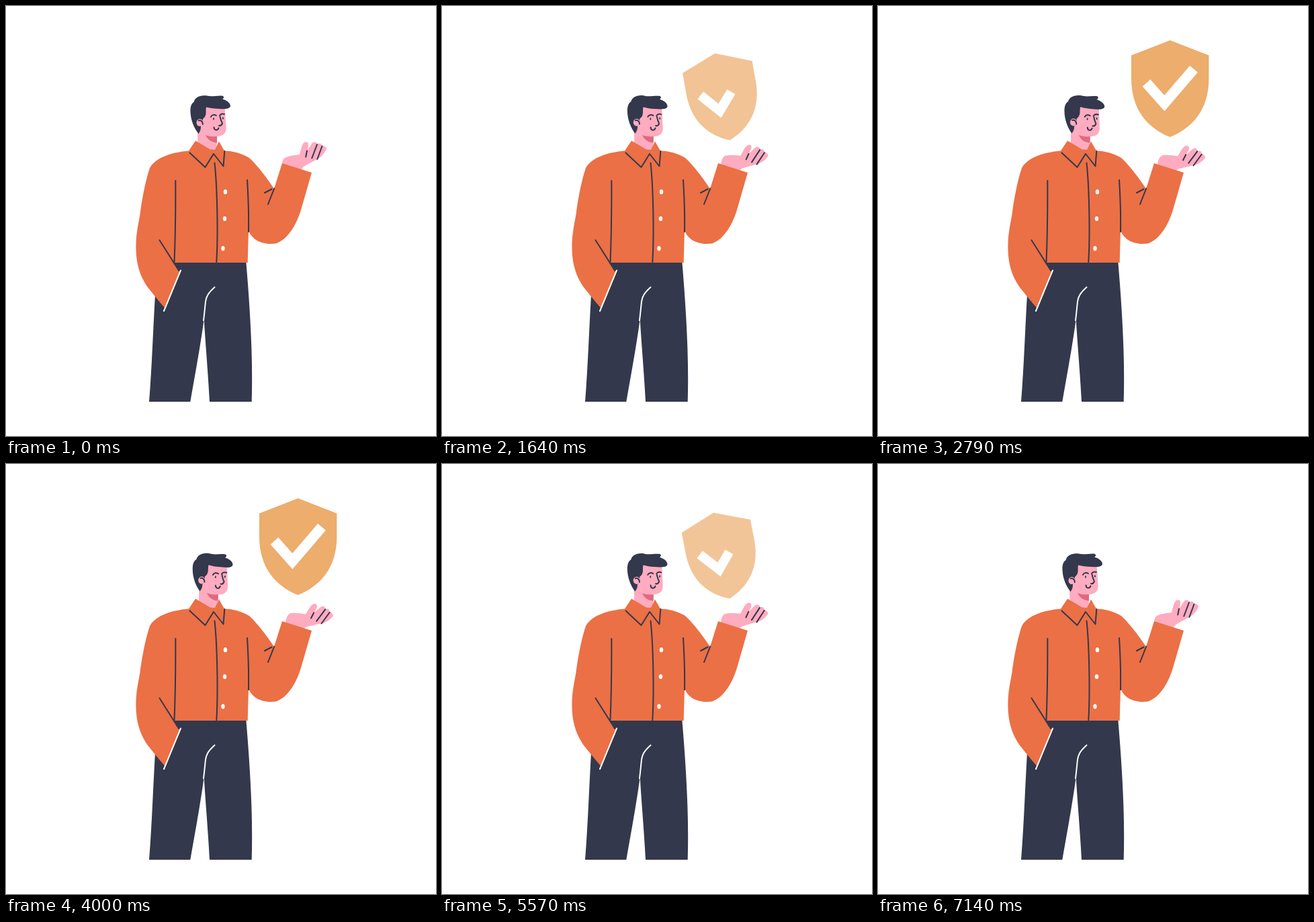
An HTML page for the animation above (7210 ms loop, 640x640 px).

```html
<!DOCTYPE html>
<html lang="en">
<head>
<meta charset="utf-8">
<title>Man presenting a shield</title>
<style>
html, body { margin: 0; width: 100%; height: 100%; overflow: hidden; background: #fff; }
svg { display: block; width: 100vw; height: 100vh; }
.navy { fill: #33384c; }
.pink { fill: #ffabc0; }
.line { fill: none; stroke: #33384c; stroke-width: 2; stroke-linecap: round; stroke-linejoin: round; }
.white { stroke: #fff; }
</style>
</head>
<body>
<svg viewBox="0 0 640 640">
  <g id="shield">
    <path fill="#ecad6d" d="M434.7 51L492.4 73.5V108C492.4 155 467 182 434.5 195C402 182 377 155 377 108V73.5Z"/>
    <path id="check" pathLength="1" fill="none" stroke="#fff" stroke-width="15.5" d="M399.5 114.5L426.3 144.7L470 93.7"/>
  </g>

  <path class="navy" d="M222 430C219 480 217 540 213 589H274.300C283 540 291 495 294.700 466C297 505 301 550 303 589H365.700C367.500 525 364 460 357.300 380H250L236 410Z"/>
  <path class="line white" d="M310.500 418.500C300 428 298 433 297 440C296 450 295 460 294 468"/>

  <g id="head">
    <path class="pink" d="M288 150H325.500L327.700 181C328 190 322 194 314 194V203L312 222H286L285 186Z"/>
    <path fill="#e0697e" d="M297 192C302 194.500 308 194.500 314 194V203.500C306 203 300 199 297 192Z"/>
    <path class="navy" d="M286.500 190C280 182 275 170 274.500 158C274 150 276 145 279.500 143C281 136 289 132 299 133.500C306 135.500 314 133 321 133.500C325 134 325 137 322 138.500C328 140 334 144 334 149C333 153.500 325 153.500 318 153C310 153 304 152 298 150.500C296.500 156 300 163 293 168V176L290 179C290 184 289 187 286.500 190Z"/>
    <ellipse class="pink" cx="288.500" cy="173.500" rx="5" ry="5.500"/>
    <path class="line" d="M286.500 170.500C290 169.500 293 172 292.800 176M305 165C306 162 310 161 313 163M318 163C319.500 160.500 322 160 325 161M318.500 164.500C319.500 169 320.500 172 322 174.500C321 178 319 178.500 317 178M309.500 180.500C310 185.500 315 186 316.500 181.500"/>
    <ellipse class="navy" cx="309" cy="168" rx="1" ry="1.800"/>
    <ellipse class="navy" cx="323" cy="167" rx="1" ry="1.800"/>
  </g>

  <g id="hand">
    <path class="pink" d="M411 237C411 232 412 228 415 226C421 223 430 222 437 221C439 214 440 206 444 203C448 200.500 451 204 450 208L448.500 215L455 205C458 201 463 202.500 463 206C467 203 470 204.500 470 208C473 207.500 478 210 476.700 213C474 220 467 227 461 229L443 239L440 243V251L412 245Z"/>
    <path class="line" d="M448 215.500L446.200 224.500M463 206L455.300 226.500M470.500 208.500L463.300 228"/>
  </g>

  <path fill="#eb7045" d="M272 215.500C245 218 222 226 214 241C207 262 202 290 199.500 310C196 330 193 342 193.500 362C194 390 203 408 212 420C219 429 228 440 236 449L260 394L257.500 395L250 382H359.700L361 334C366 348 380 354 394 354L402 353.500C420 347 433 325 440 300L455 248L411 234L399 272C385 251 371 234 362 226C350 219 338 216 325 215.500L317 201.500L311 214L304 213.500L282 200.500Z"/>
  <path class="line" d="M273.500 218.500L296.500 240L309 220L323.500 238.500L325.300 216M310.500 233.500C314 265 316 335 313.300 381.500M252.300 260C252.500 300 252 345 250.500 381M228.500 348.500L257 393.500M359 259C361 290 361.500 310 361 336M385 278L395.500 272.500M399.300 271.500L390 295"/>
  <path class="line white" d="M260 393.500L235 454"/>
  <g fill="#fff">
    <ellipse cx="326.500" cy="276.700" rx="2.700" ry="3.600"/>
    <ellipse cx="325.500" cy="316.500" rx="2.700" ry="3.600"/>
    <ellipse cx="323" cy="360.800" rx="2.700" ry="3.600"/>
  </g>
</svg>
<script>
const LOOP = 7210, MIRROR = 7172;
const [shield, check, head, hand] = ['shield', 'check', 'head', 'hand'].map(id => document.getElementById(id));
const clamp = x => Math.min(1, Math.max(0, x));
const span = (t, from, to) => clamp((t - from) / (to - from));
const inOut = x => (1 - Math.cos(Math.PI * x)) / 2;
const out = x => Math.sin(Math.PI / 2 * x);
const turn = (angle, x, y) => `rotate(${angle} ${x} ${y})`;

// Linear interpolation through [time, value] pairs
function track(keys, t) {
  const i = keys.findIndex(k => k[0] > t);
  if (i === 0) return keys[0][1];
  if (i < 0) return keys[keys.length - 1][1];
  const [t0, a] = keys[i - 1], [t1, b] = keys[i];
  return a + (b - a) * (t - t0) / (t1 - t0);
}

const fade = [[786, 0], [886, .24], [1143, .34], [1600, .7], [2071, .94], [2400, 1]];

function draw(time) {
  // The second half plays the first half backwards
  const t = Math.max(0, Math.min(time, MIRROR - time));

  head.setAttribute('transform', turn(2.2 * inOut(span(t, 0, 3586)), 305, 245));
  hand.setAttribute('transform', turn(16 * inOut(span(t, 0, 2300)), 432.5, 254.7));

  const p = out(span(t, 786, 2480));
  const s = 1 - .31 * (1 - p);
  shield.setAttribute('transform',
    `translate(439 234.5) rotate(${-34.5 * (1 - p)}) scale(${s}) translate(-439 -234.5)`);
  shield.setAttribute('opacity', track(fade, t));
  check.setAttribute('stroke-dasharray', p < 1 ? `${p} 2` : 'none');
}

const start = performance.now();
(function tick() {
  draw((performance.now() - start) % LOOP);
  requestAnimationFrame(tick);
})();
</script>
</body>
</html>
```
